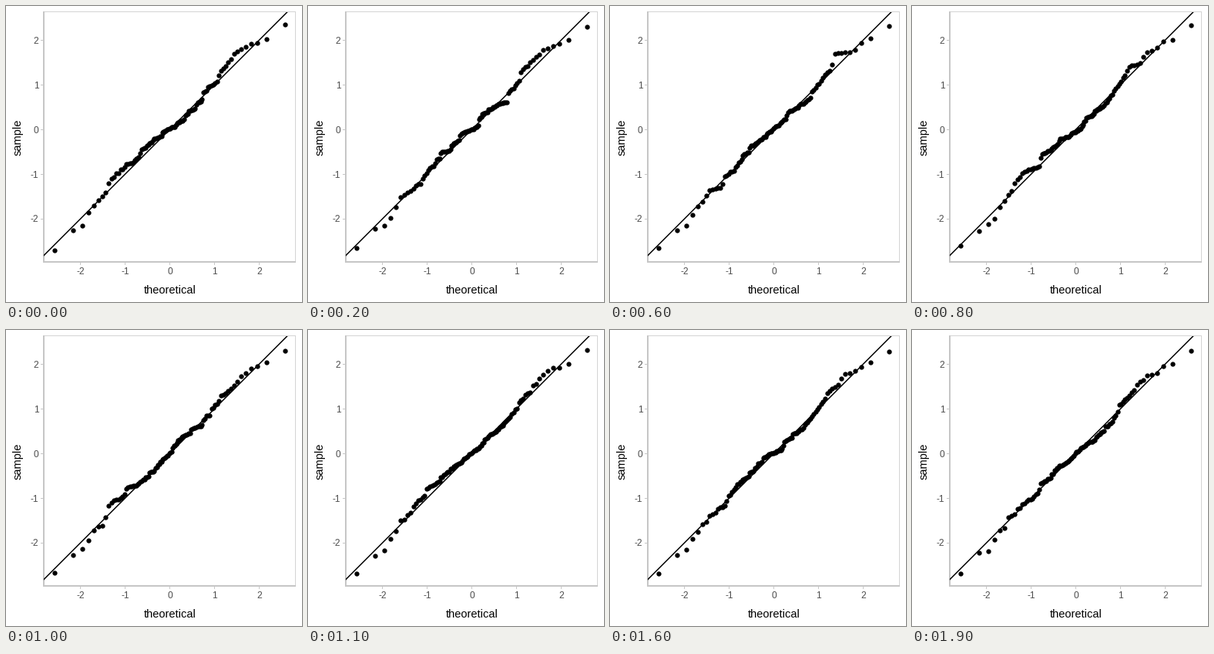
Write a matplotlib script that moves like this. It is 384 px wide and 384 px high and loops after 2 s.

```python
import math

import matplotlib.pyplot as plt
import numpy as np
from matplotlib.animation import FuncAnimation
from matplotlib.patches import Rectangle

SIZE, DPI = 384, 96
PX = 72 / DPI                      # points per pixel
N, FRAMES, STEP = 100, 20, 100
X0, Y0, UNIT = 212.5, 160.2, 57.95
LEFT, TOP, RIGHT, BOTTOM = 49, 8, 376, 332
LIGHT, GREY = "#d4d4d4", "#c6c6c6"

# Typical shape of the plot: theoretical quantile, sample quantile
SHAPE_X = [-2.58, -2.17, -1.96, -1.7, -1.44, -0.8, 0, 0.65, 0.95, 1.2, 1.6, 1.96, 2.17, 2.58]
SHAPE_Y = [-2.68, -2.27, -2.17, -1.72, -1.39, -0.72, 0, 0.58, 0.97, 1.34, 1.74, 1.95, 2.02, 2.31]


def normal_quantiles(n):
    grid = np.linspace(-4, 4, 4001)
    cdf = [0.5 * (1 + math.erf(v / math.sqrt(2))) for v in grid]
    return np.interp((np.arange(n) + 0.5) / n, cdf, grid)


Z = normal_quantiles(N)


def sample(frame):
    """Sorted sample: uneven gaps in the middle, steady tails."""
    rng = np.random.default_rng(100 + frame)
    pins = SHAPE_Y + rng.normal(0, 0.025, len(SHAPE_Y))
    base = np.interp(Z, SHAPE_X, pins)
    gaps = np.clip(np.diff(base), 0, 0.05)
    walk = np.append(0, np.cumsum(gaps * (rng.exponential(1, N - 1) - 1)))
    # Tie the walk back to the shape at its pins
    walk -= np.interp(Z, SHAPE_X, np.interp(SHAPE_X, Z, walk))
    return np.sort(base + walk)


def px(v):
    return X0 + UNIT * v


def py(v):
    return Y0 - UNIT * v


fig = plt.figure(figsize=(SIZE / DPI, SIZE / DPI), dpi=DPI, facecolor="white")
ax = fig.add_axes([0, 0, 1, 1])
ax.set_xlim(0, SIZE)
ax.set_ylim(SIZE, 0)
ax.axis("off")


def bar(x, y, w, h, color):
    ax.add_patch(Rectangle((x, y), w, h, fc=color, lw=0, zorder=1))


def label(x, y, text, size, color, ha="center", angle=0):
    ax.text(x, y, text, fontsize=size * PX, color=color, ha=ha, va="baseline",
            rotation=angle, rotation_mode="anchor", family="Liberation Sans")


# Panel border
bar(LEFT, TOP - 1, RIGHT - LEFT, 1, LIGHT)
bar(RIGHT - 1, TOP - 1, 1, BOTTOM - TOP + 1, LIGHT)
bar(LEFT - 1, TOP - 1, 2, BOTTOM - TOP + 2, GREY)
bar(LEFT - 1, BOTTOM - 1, RIGHT - LEFT + 1, 2, GREY)

# Axes
for v in range(-2, 3):
    bar(round(px(v) - 0.5), BOTTOM + 1, 1, 3, GREY)
    label(px(v), 348, str(v), 12, "#4d4d4d")
    bar(LEFT - 4, round(py(v) - 0.5), 3, 1, GREY)
    label(42.5, py(v) + 4.4, str(v), 12, "#4d4d4d", "right")
label(212.5, 373, "theoretical", 14.67, "black")
label(19.5, 170, "sample", 14.67, "black", angle=90)

# Reference line
panel = Rectangle((LEFT, TOP), RIGHT - LEFT - 1, BOTTOM - TOP, transform=ax.transData)
line, = ax.plot([px(-3), px(3)], [py(-3), py(3)], color="black", lw=1.5 * PX, zorder=2)
line.set_clip_path(panel)

dots, = ax.plot(px(Z), py(sample(0)), "o", color="black", ms=6.3 * PX, mew=0, zorder=3)


def draw(frame):
    dots.set_ydata(py(sample(frame)))
    return dots,


anim = FuncAnimation(fig, draw, frames=FRAMES, interval=STEP, repeat=True, repeat_delay=0)
plt.show()
```
